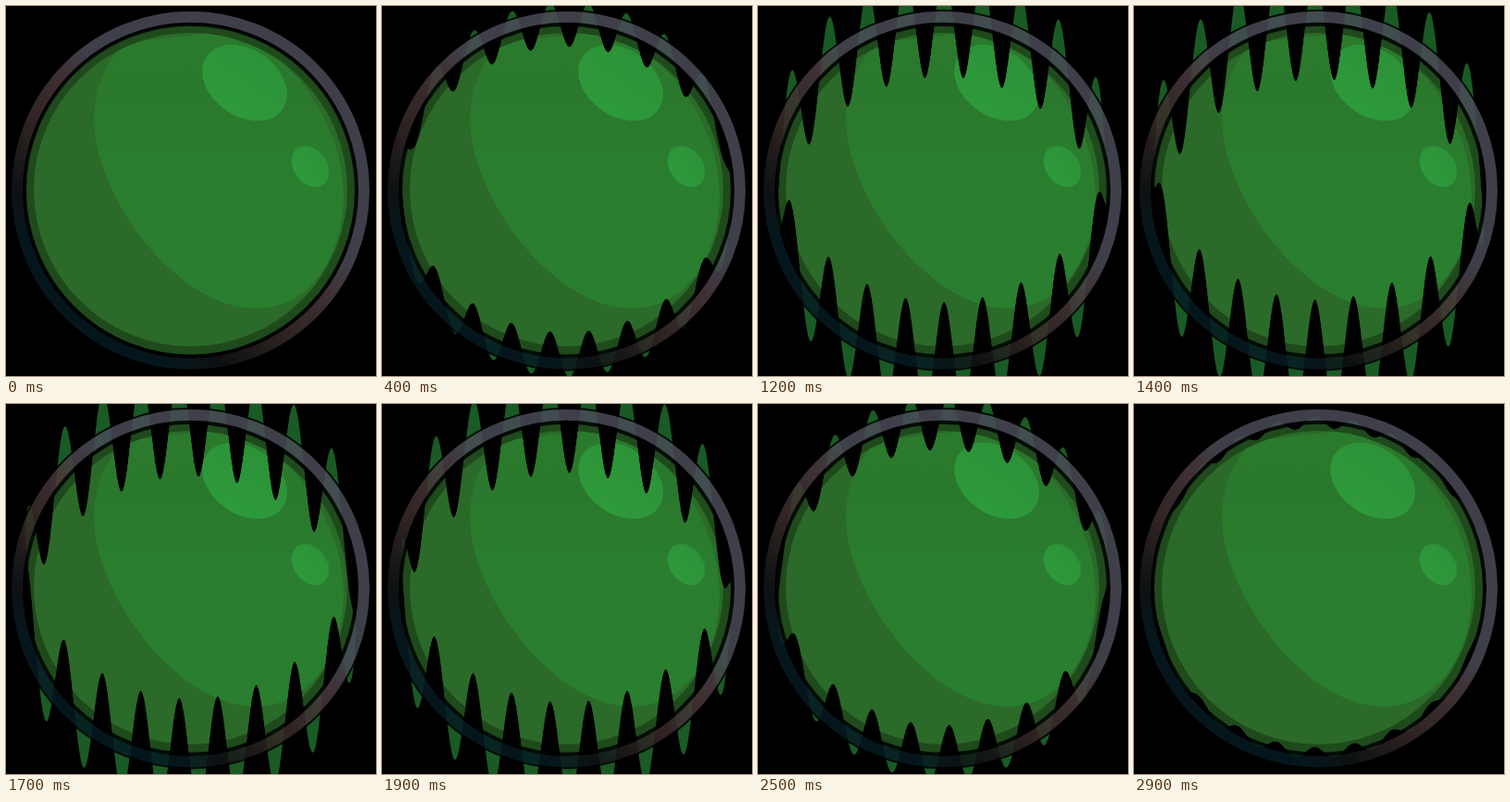
An HTML page that plays this animation: 400x400 px, repeating every 3 s.

```html
<!DOCTYPE html>
<html lang="en">
<head>
<meta charset="utf-8">
<title>Wavy orb</title>
<style>
  html, body { margin: 0; width: 100%; height: 100%; overflow: hidden; background: #000; }
  svg { display: block; width: 100vw; height: 100vh; }
</style>
</head>
<body>
<svg viewBox="0 0 400 400">
  <defs>
    <clipPath id="wave"><path id="outline"/></clipPath>
    <clipPath id="inner"><circle cx="199.500" cy="198.500" r="169.500"/></clipPath>
    <linearGradient id="metal" gradientUnits="userSpaceOnUse" x1="328" y1="46" x2="72" y2="354">
      <stop offset=".38" stop-color="#4a4b57"/>
      <stop offset=".48" stop-color="#4a393d"/>
      <stop offset=".64" stop-color="#382a28"/>
      <stop offset=".8" stop-color="#101516"/>
      <stop offset=".9" stop-color="#051b22"/>
    </linearGradient>
    <linearGradient id="light" x2="0" y2="1">
      <stop offset="0" stop-color="#2b7a2c"/>
      <stop offset=".25" stop-color="#2a782d"/>
      <stop offset=".5" stop-color="#2a7d2f"/>
      <stop offset="1" stop-color="#2a7e2f"/>
    </linearGradient>
    <linearGradient id="shine" x2="0" y2="1">
      <stop offset="0" stop-color="#2c9238"/>
      <stop offset="1" stop-color="#2d9a3b"/>
    </linearGradient>
  </defs>
  <rect width="400" height="400"/>
  <g clip-path="url(#wave)">
    <rect width="400" height="400" fill="#1a5a25"/>
    <circle cx="199.500" cy="198.500" r="178.500" fill="#1f4a1c"/>
    <g clip-path="url(#inner)">
      <rect width="400" height="400" fill="#2b6a28"/>
      <path fill="url(#light)" d="M128 40Q95 75 95 122C95 205 185 327 270 327C330 327 365 268 365 205C365 150 336 95 300 62V20Z"/>
      <ellipse rx="50" ry="36" transform="translate(258 83) rotate(35)" fill="url(#shine)"/>
      <ellipse rx="24" ry="18" transform="translate(329 173.500) rotate(55)" fill="url(#shine)"/>
    </g>
  </g>
  <g fill="none" opacity=".85">
    <circle cx="199.500" cy="199.250" r="186.500" stroke="#000" stroke-width="18"/>
    <circle cx="199.500" cy="199.250" r="187.500" stroke="url(#metal)" stroke-width="12"/>
  </g>
</svg>
<script>
const LOOP = 3000, STEP = 100, CX = 199.5, CY = 198.5, R = 178.5;
const HEIGHT = 60, WAVELENGTH = 41.43, CREST = 213.6;
const outline = document.getElementById('outline');

// Circle whose points are shifted up and down by a travelling sine wave.
function wavyCircle(p) {
  const height = HEIGHT * Math.sin(Math.PI * p);
  const top = [], bottom = [];
  for (let dx = -R; dx <= R; dx += 0.5) {
    const x = CX + dx;
    const y = CY + height * Math.cos(2 * Math.PI * ((x - CREST) / WAVELENGTH + 2 * p));
    const half = Math.sqrt(R * R - dx * dx);
    top.push(`${x} ${(y - half).toFixed(2)}`);
    bottom.unshift(`${x} ${(y + half).toFixed(2)}`);
  }
  return `M${top.concat(bottom).join('L')}Z`;
}

function draw() {
  const t = Math.floor(performance.now() % LOOP / STEP) * STEP;
  outline.setAttribute('d', wavyCircle(t / LOOP));
  requestAnimationFrame(draw);
}
draw();
</script>
</body>
</html>
```
